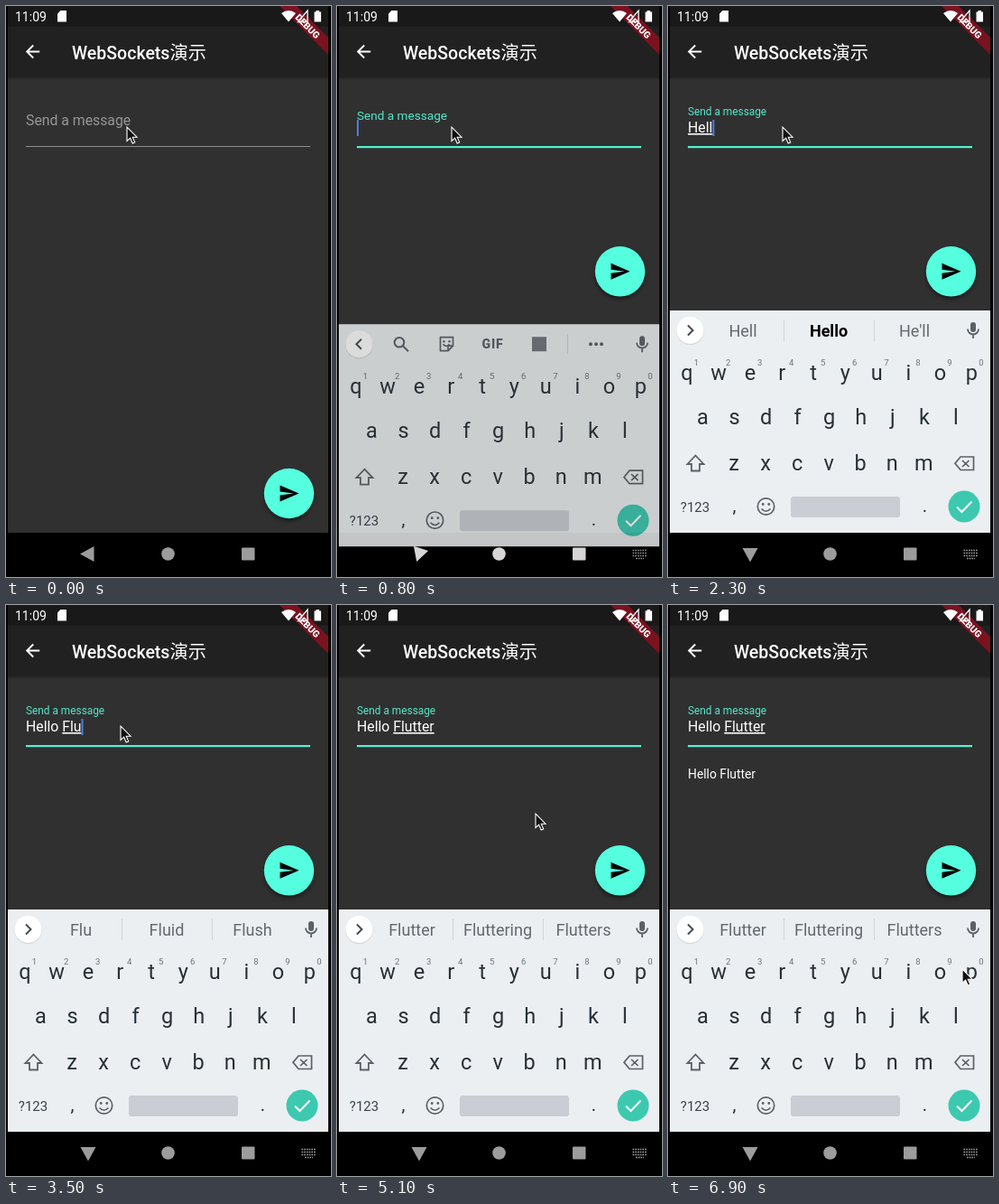
These frames come from a looping animation (360x632 px, 7000 ms). An HTML page:

```html
<!DOCTYPE html>
<html lang="en">
<head>
<meta charset="utf-8">
<title>WebSockets演示</title>
<style>
html, body { margin: 0; width: 100%; height: 100%; overflow: hidden; background: #000; }
svg { display: block; width: 360px; height: 632px; font-family: Roboto, "Noto Sans CJK SC", "Noto Sans CJK", sans-serif; }
text { white-space: pre; }
</style>
</head>
<body>
<svg id="stage" viewBox="0 0 360 632">
  <defs>
    <clipPath id="screen"><rect x="2" width="355" height="630"/></clipPath>
    <linearGradient id="shade" x2="0" y2="1"><stop stop-opacity=".35"/><stop offset="1" stop-opacity="0"/></linearGradient>
    <filter id="soft" x="-30%" y="-30%" width="160%" height="170%"><feGaussianBlur stdDeviation="2.5"/></filter>
  </defs>
  <rect width="360" height="632"/>
  <g clip-path="url(#screen)">
    <rect x="2" width="355" height="583" fill="#303030"/>
    <rect x="2" y="78" width="355" height="4" fill="url(#shade)"/>
    <rect x="2" width="355" height="78" fill="#212121"/>
    <rect x="2" width="355" height="23" fill="#191919"/>
    <path d="M303 0H322L357 35V54Z" fill="#7a1220"/>
    <text transform="translate(334 22.5) rotate(45)" y="3.6" font-size="10.4" font-weight="900" fill="#fff" text-anchor="middle">DEBUG</text>
    <g fill="#fff">
      <text x="10" y="16.5" font-size="14">11:09</text>
      <path d="M60.5 5H67V17.500H57V8.500Z"/>
      <path d="M305 8Q313 2 321 8L313 17.500Z"/>
      <path d="M334 5V17.500H323.500Z" fill="none" stroke="#fff" stroke-width="1.3"/>
      <path d="M341.500 6.500H343.500V5H347V6.500H349V17.500H341.500Z"/>
      <path transform="translate(18 39) scale(.96)" d="M20 11H7.830l5.590-5.590L12 4l-8 8 8 8 1.410-1.410L7.830 13H20z"/>
      <text x="73" y="58.500" font-size="19.500" font-weight="500">WebSockets<tspan font-weight="400" font-size="20.200">演示</tspan></text>
    </g>
    <text id="label" x="22">Send a message</text>
    <rect id="line" x="22" width="315"/>
    <text x="22" y="140" font-size="15.800" fill="#fff"><tspan id="done"></tspan><tspan id="word" text-decoration="underline"></tspan></text>
    <rect id="caret" y="126" width="2" height="18" fill="#4b7fe0"/>
    <text id="message" x="22" y="192" font-size="13.850" fill="#fff">Hello Flutter</text>
    <g id="fab">
      <circle cy="3" r="27" opacity=".55" filter="url(#soft)"/>
      <circle r="27.700" fill="#54fedf"/>
      <circle id="ripple" fill="#fff"/>
      <path transform="translate(-12 -12)" d="M2 21L23 12 2 3V10l15 2-15 2z"/>
    </g>
    <rect x="2" y="583" width="355" height="49"/>
    <g id="keyboard"></g>
    <g id="nav">
      <path id="back" d="M-9 0L6.500-8.500V8.500Z"/>
      <circle cx="179.500" cy="606.500" r="7.300"/>
      <rect x="261" y="599.500" width="14.500" height="14" rx="1"/>
      <path id="switcher" d="M327.500 602.500H343M327.500 605.500H343M327.500 608.500H343M331 611.500H340" stroke-width="1.600" stroke-dasharray="1.700 1"/>
    </g>
  </g>
  <path id="pointer" d="M0 0V15.500L3.600 12.200L6.200 18L8.700 16.900L6.200 11.200H11Z" fill="#111" stroke="#fff" stroke-width="1.100"/>
</svg>
<script>
const LOOP = 7000, STEP = 100;
const $ = id => document.getElementById(id);
const set = (el, attrs) => { for (const k in attrs) el.setAttribute(k, attrs[k]); };
const clamp = v => Math.max(0, Math.min(1, v));
const mix = (a, b, p) => a + (b - a) * p;
const easeOut = p => 1 - (1 - p) ** 2;

const TEXT = "Hello Flutter";
const KEY_TIMES = [1700, 1900, 2000, 2200, 2500, 2700, 3000, 3200, 3400, 3800, 4000, 4200, 4400];
const HINTS = ["H,Hey,Hi", "He,Her,Hey", "Hel,Hello,Help", "Hell,Hello,He'll", "Hello,Hellos,Hello's",
  "there,my,and", "F,For,From", "Fl,Fly,Flight", "Flu,Fluid,Flush", "Flut,Flute,Flutter",
  "Flutt,Flutter,Flutters", "Flutte,Flutter,Flutters", "Flutter,Fluttering,Flutters"];
const POINTER = [[0, 134, 134], [100, 134, 134], [300, 127, 134], [4700, 127, 134], [5100, 220, 231],
  [5500, 309, 290], [6300, 309, 290], [6900, 326, 403], [LOOP, 326, 403]];
const FOCUS = 800, TAP = 5600, REPLY = 6000;

const label = (s, x, y, size, fill = "#263036", extra = "") =>
  `<text x="${x}" y="${y}" font-size="${size}" fill="${fill}" text-anchor="middle" ${extra}>${s}</text>`;
const stroke = (d, color = "#5a6166", w = 2) => `<path d="${d}" fill="none" stroke="${color}" stroke-width="${w}"/>`;
const ring = (x, y, r, w = 1.7) => `<circle cx="${x}" cy="${y}" r="${r}" fill="none" stroke="#5a6166" stroke-width="${w}"/>`;
const dot = (x, y, r, fill = "#5a6166") => `<circle cx="${x}" cy="${y}" r="${r}" fill="${fill}"/>`;
const row = (keys, x, y) => [...keys].map((c, i) => label(c, x + i * 35.05, y, 23.5)).join("");

function buildKeyboard() {
  const digits = [..."1234567890"].map((c, i) => label(c, 31.5 + i * 35.05, 397.5, 9.5, "#6c7479")).join("");
  const tools = ring(69, 357, 5.3, 2) + stroke("M73 361L79 367") +
    stroke("M114.500 351.500H128.500V361L123 366.500H114.500ZM128.500 361H123V366.500M117.500 359Q121 363.500 124.500 359", undefined, 1.7) +
    dot(118.5, 356, 1.2) + dot(124.5, 356, 1.2) +
    label("GIF", 172.5, 364, 14, "#5a6166", 'font-weight="900" letter-spacing=".8"') +
    '<rect x="216" y="351" width="16" height="16" fill="#70777b"/>' +
    stroke("M255.500 348V370", "#d0d4d7", 1) + [281, 287, 293].map(x => dot(x, 359, 2)).join("");
  $("keyboard").innerHTML =
    '<rect x="2" y="337" width="355" height="246" fill="#eceff1"/>' +
    dot(24.5, 360, 15.3, "#d5d9dc") + dot(24.5, 359, 15, "#fff") +
    '<path id="chevron" fill="none" stroke="#444b50" stroke-width="2"/>' +
    `<g id="tools">${tools}</g>` +
    `<g id="hints">${stroke("M128.500 347V371M228.500 347V371", "#d0d4d7", 1)}` +
    [83, 178, 273].map(x => label("", x, 366, 18, "#62696e")).join("") + "</g>" +
    '<rect x="335" y="350" width="6" height="11" rx="3" fill="#5a6166"/>' +
    stroke("M332 357.500A6 6 0 0 0 344 357.500M338 363.500V368", undefined, 1.8) +
    row("qwertyuiop", 21, 413.5) + digits + row("asdfghjkl", 38.5, 463) + row("zxcvbnm", 73, 513.5) +
    stroke("M30.500 497.500L39.500 507H35V514.500H26V507H21.500Z", undefined, 1.8) +
    stroke("M324 499H338.500V513.500H324L318 506.200ZM326 503L333.500 510M333.500 503L326 510", undefined, 1.7) +
    label("?123", 30, 559.5, 15, "#37424a") + label(",", 73.5, 560, 20) + label(".", 284.5, 560, 20) +
    ring(108.5, 554, 9.2) + dot(105.2, 551.5, 1.4) + dot(111.8, 551.5, 1.4) + stroke("M103.500 556.500Q108.500 562 113.500 556.500", undefined, 1.6) +
    '<rect x="136" y="543" width="121" height="23" rx="3" fill="#cacdd4"/>' +
    dot(328, 554, 17.5, "#3cc9b0") + stroke("M320 554.500L325.500 560L336.500 548.500", "#fff");
}

function pointerAt(t) {
  const i = POINTER.findIndex(k => k[0] > t), [a, x1, y1] = POINTER[i - 1], [b, x2, y2] = POINTER[i];
  const p = clamp((t - a) / (b - a));
  return `translate(${mix(x1, x2, p)} ${mix(y1, y2, p)})`;
}

function drawField(t) {
  const focused = t >= FOCUS, p = easeOut(clamp((t - FOCUS + 100) / 300)) * focused;
  set($("label"), { y: mix(132, 121, p), "font-size": mix(15.8, 11.85, p), fill: focused ? "#54e8c9" : "#979797" });
  set($("line"), { y: 155, height: focused ? 2.2 : 1, fill: focused ? "#54f0d0" : "#8c8c8c" });

  const count = KEY_TIMES.filter(k => k <= t).length, typed = TEXT.slice(0, count);
  const split = typed.lastIndexOf(" ") + 1;
  $("done").textContent = typed.slice(0, split);
  $("word").textContent = typed.slice(split);
  const width = count ? $("done").parentNode.getComputedTextLength() : 0;
  const since = t - (count ? KEY_TIMES[count - 1] : FOCUS);
  set($("caret"), { x: 22 + width, opacity: +(focused && since % 1000 < 500) });
  drawHints(count);
}

function drawHints(count) {
  set($("tools"), { opacity: +!count });
  set($("hints"), { opacity: +!!count });
  set($("chevron"), { d: count ? "M22 353.500L27.500 359L22 364.500" : "M27 353.500L21.500 359L27 364.500" });
  const words = count ? HINTS[count - 1].split(",") : ["", "", ""];
  const strong = count === 4;
  $("hints").querySelectorAll("text").forEach((el, i) => {
    el.textContent = words[i];
    set(el, { "font-weight": strong && i === 1 ? 700 : 400, fill: strong && i === 1 ? "#000" : "#62696e" });
  });
}

function draw(t) {
  const p = easeOut(clamp((t - 600) / 300));
  set($("keyboard"), { transform: `translate(0 ${137 * (1 - p)})`, opacity: clamp(p * 0.93 + (p === 1)) });
  set($("nav"), { fill: p > 0 && p < 1 ? "#d6d6d6" : "#9c9c9c" });
  set($("back"), { transform: `translate(91 606.500) rotate(${-90 * clamp((t - 600) / 250)})` });
  set($("switcher"), { stroke: "#9c9c9c", opacity: p });
  set($("fab"), { transform: `translate(313.500 ${t < FOCUS ? 539.5 : 293.8})` });
  const r = clamp((t - TAP) / 400);
  set($("ripple"), { r: 27.7 * r, opacity: r < 1 ? 0.3 * (1 - r) : 0 });
  set($("message"), { opacity: +(t >= REPLY) });
  set($("pointer"), { transform: pointerAt(t) });
  drawField(t);
}

buildKeyboard();
const start = performance.now();
function tick() {
  const t = (performance.now() - start) % LOOP;
  draw(Math.floor(t / STEP) * STEP);
  requestAnimationFrame(tick);
}
tick();
</script>
</body>
</html>
```
